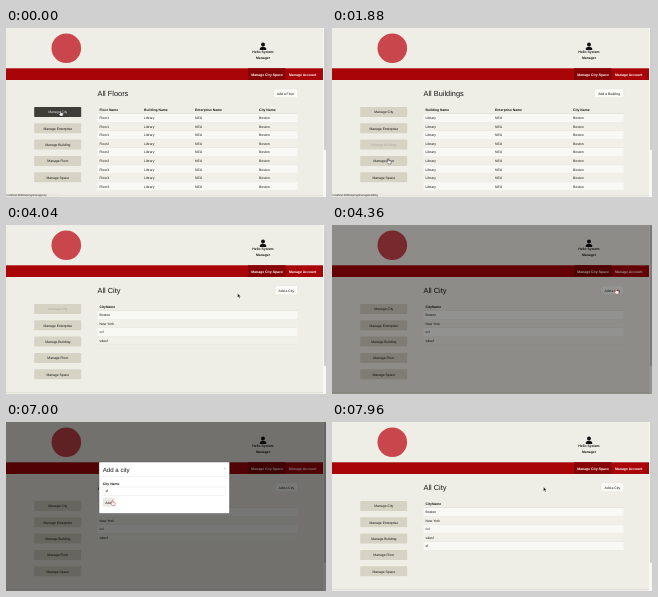
An HTML page that plays this animation: 320x169 px, repeating every 8 s.

```html
<!DOCTYPE html>
<html lang="en">
<head>
<meta charset="utf-8">
<title>Space manager</title>
<style>
html, body { margin: 0; width: 100%; height: 100%; overflow: hidden; background: #efeee6; }
svg { display: block; width: 100%; height: 100%; }
text { font-family: "Liberation Sans", Arial, sans-serif; font-size: 3.4px; fill: #151513; text-rendering: geometricPrecision; }
.b { font-weight: bold; }
.nav { font-weight: bold; font-size: 3.45px; fill: #fff; }
.mid { text-anchor: middle; }
</style>
</head>
<body>
<svg id="stage" viewBox="0 0 320 169" xmlns="http://www.w3.org/2000/svg"></svg>
<script>
const LOOP = 8000;
const ROW = 8.55;
const GAP = 16.3;          // distance between menu buttons
const FIRST = 240;         // first menu click
const BEAT = 580;          // time between menu clicks
const BACK = 3650;         // return to the city page
const SUBMIT = 7480;
const stage = document.getElementById('stage');

const text = (x, y, s, attrs = '') => `<text x="${x}" y="${y}" ${attrs}>${s}</text>`;
const rect = (x, y, w, h, fill, attrs = '') =>
  `<rect x="${x}" y="${y}" width="${w}" height="${h}" fill="${fill}" ${attrs}/>`;

const menu = ['City', 'Enterprise', 'Building', 'Floor', 'Space'];
const place = ['Library', 'NEU', 'Boston'];
const cities = ['Boston', 'New York', 'ccl', 'vdasf'].map(s => [s]);
const floors = Array.from({ length: 9 }, (_, i) => ['Floor' + (1 + Math.floor(i / 3)), ...place]);
const spaces = ['Room1', 'Room2', 'Room21', 'Room22', 'Room21', 'Room41', 'Toilet1', 'Toilet2', 'Toilet3']
  .map((name, i) => [name, 'Floor' + (i % 4 === 3 ? 2 : 1), ...place, i < 6]);

const page = (title, add, cols, head, rows) => ({ title, add, cols, head, rows });
const pages = {
  Floor: page('All Floors', 'Floor', [93.5, 138, 189, 253],
    ['Floor Name', 'Building Name', 'Enterprise Name', 'City Name'], floors),
  City: page('All City', 'City', [93.5], ['CityName'], cities),
  Added: page('All City', 'City', [93.5], ['CityName'], [...cities, ['sf']]),
  Enterprise: page('All Enterprises', 'Enterprise', [93.5, 190],
    ['Enterprise Name', 'City Name'], [['NEU', 'Boston']]),
  Building: page('All Buildings', 'Building', [93.5, 163, 241],
    ['Building Name', 'Enterprise Name', 'City Name'], Array(9).fill(place)),
  Space: page('All Space', 'Space', [93.5, 126, 155.5, 190.5, 232.5, 260],
    ['Space Name', 'Floor Name', 'Building Name', 'Enterprise Name', 'City Name', 'Space Status'], spaces)
};

function pageMarkup([id, p]) {
  const w = 16 + p.add.length * 1.65;
  const head = p.head.map((h, i) => text(p.cols[i], 82.7, h, 'class="b"')).join('');
  const rows = p.rows.map((cells, r) => {
    const y = 85.8 + r * ROW;
    return rect(91.5, y, 200, ROW, r % 2 ? '#f0efe8' : '#f8f8f5') +
      rect(91.5, y + ROW - .3, 200, .3, '#dddcd3') +
      cells.map((c, i) => text(p.cols[i], y + 5.4, c)).join('');
  }).join('');
  return `<g id="${id}">
    ${text(91.5, 68.3, p.title, 'style="font-size:7.4px"')}
    ${rect(291.7 - w, 60.7, w, 9, '#fbfbf8', 'rx=".8" stroke="#deddd4" stroke-width=".4"')}
    ${text(291.7 - w / 2, 66.5, 'Add a ' + p.add, 'class="mid"')}
    ${head}${rect(91.5, 85.2, 200, .6, '#d9d8cf')}${rows}
    ${rect(318.2, 0, 1.6, p.rows.length > 5 ? 122 : 141, '#c2c2bf', 'rx=".8"')}
  </g>`;
}

const buttons = menu.map((name, i) => {
  const y = 79 + i * GAP;
  return rect(28.2, y, 47, 10, '#d6d3c5', `id="box${i}" rx=".8"`) +
    text(51.8, y + 6.3, 'Manage ' + name, `id="label${i}" class="mid"`);
}).join('');

const header = `
  <circle cx="60.3" cy="20.3" r="14.8" fill="#c9464d"/>
  <circle cx="257" cy="16.6" r="2" fill="#111"/>
  <path d="M253.800 22v-1.200q0-1.800 3.200-2.100q3.200.3 3.200 2.100V22z" fill="#111"/>
  ${text(257, 25.4, 'Hello System', 'class="b mid"')}
  ${text(257, 31, 'Manager', 'class="b mid"')}
  ${rect(0, 40.3, 317, 11.7, '#a90508')}
  ${rect(242, 40.3, 37.5, 11.7, '#860204')}
  ${text(245.3, 48, 'Manage City-Space', 'class="nav"')}
  ${text(283, 48, 'Manage Account', 'class="nav"')}`;

const modal = `<g id="modal">
  ${rect(93, 40, 130.5, 51.5, '#fff', 'rx="1" stroke="#444" stroke-width=".4"')}
  ${text(96.8, 49.8, 'Add a city', 'style="font-size:6.1px"')}
  ${text(217.5, 47.5, '×', 'style="font-size:4.5px;fill:#bbb"')}
  ${rect(93, 54, 130.5, .4, '#e6e6e2')}
  ${text(96.8, 62.6, 'City Name', 'class="b"')}
  ${rect(96.8, 65, 122.5, 8.5, '#fff', 'id="field" rx=".6" stroke-width=".5"')}
  ${text(99.4, 70.3, '', 'id="typed"')}
  ${rect(96.8, 75.8, 11.5, 9, '#fff', 'id="addBox" rx=".6"')}
  ${text(99.3, 81.5, 'Add')}
</g>`;

stage.innerHTML = `
  ${rect(0, 0, 320, 169, '#efeee6')}${header}${buttons}
  ${rect(317, 0, 3, 169, '#f7f7f4')}${rect(0, 167.3, 317, .5, '#d0cfc8')}
  ${Object.entries(pages).map(pageMarkup).join('')}
  <g id="status">${rect(0, 165.5, 52, 3.5, '#e8e7e0')}${text(.6, 168.2, '', 'id="url" style="font-size:2.7px"')}</g>
  ${rect(0, 0, 320, 169, '#000', 'id="dim"')}${modal}
  <path id="arrow" d="M0 0v4.2l1-.9l.7 1.6l.7-.3l-.7-1.6h1.3z" fill="#111" stroke="#fff" stroke-width=".3"/>
  <path id="hand" d="M-.5 0q.5-.5 1 0v1.7l2 .5q.5.2.4.8l-.4 2h-2.6l-1.700-2q0-.8.8-.5l.5.4z" fill="#fff" stroke-width=".45"/>`;

const el = id => document.getElementById(id);
const set = (id, name, value) => el(id).setAttribute(name, value);
const show = (id, on) => set(id, 'visibility', on ? 'visible' : 'hidden');
const ramp = (t, a, b) => Math.max(0, Math.min(1, (t - a) / (b - a)));
const ease = u => u * u * (3 - 2 * u);

// Pointer moves after the menu tour: start, end, x, y, hand on arrival
const moves = [
  [2800, 3160, 78, 110, false],
  [3250, 3500, 57, 83, true],
  [3800, 4150, 284, 64, true],
  [4650, 5500, 123, 74, false],
  [6600, 6950, 106.5, 78.5, true],
  [7300, 7850, 211.5, 65, false]
];

// The tour clicks each menu button in turn, one per beat.
function tour(t) {
  const step = Math.min(4, Math.floor((t - FIRST) / BEAT));
  const local = t - FIRST - step * BEAT;
  const pos = Math.min(4, step + ease(ramp(local, 120, 340)));
  const pressed = step < 0 || (step < 4 && local > 490) ? step + 1 : -1;
  return { step, pos, pressed };
}

function pointer(t, pos) {
  let x = 54.5 + pos * .6, y = 83 + pos * GAP * .98, hand = true;
  for (const [a, b, u, v, over] of moves) {
    if (t < a) break;
    const k = ease(ramp(t, a, b));
    x += (u - x) * k;
    y += (v - y) * k;
    hand = over && k > .9;
  }
  return { x, y, hand };
}

function draw(t) {
  const { step, pos, pressed } = tour(t);
  const back = t >= BACK;
  const current = t >= SUBMIT ? 'Added' : back ? 'City' : menu[step] || 'Floor';
  const press = t > BACK - 90 && !back ? 0 : pressed;
  const focus = t > 4200 ? -1 : back ? 0 : step;
  Object.keys(pages).forEach(id => show(id, id === current));
  menu.forEach((_, i) => {
    set('box' + i, 'fill', i === press ? '#3e3d38' : '#d6d3c5');
    el('label' + i).style.fill = i === press ? '#f2f1ec' : i === focus ? '#a9a799' : '#151513';
  });

  const link = t > 3400 ? 'City' : t > 3000 ? 'Building' : menu[Math.max(0, step)];
  show('status', t < 3850);
  el('url').textContent = 'localhost:8080/spring/manage' + link.toLowerCase();

  set('dim', 'opacity', .52 * ramp(t, 4230, 4395) * (1 - ramp(t, 7500, 7640)));
  const open = ease(ramp(t, 4395, 4695)) * (1 - ease(ramp(t, 7240, 7500)));
  set('modal', 'opacity', open);
  set('modal', 'transform', `translate(0 ${-14 * (1 - open)})`);
  set('field', 'stroke', t > 5250 && t < 6960 ? '#9fcbe6' : '#e6e6e2');
  el('typed').textContent = 'sf'.slice(0, Math.max(0, Math.floor((t - 4800) / 700)));
  set('addBox', 'fill', t > 6900 ? '#e9e9e6' : '#fff');

  const { x, y, hand } = pointer(t, pos);
  show('hand', hand);
  show('arrow', !hand);
  set('hand', 'stroke', t > 4240 ? '#b8343c' : '#111');
  set(hand ? 'hand' : 'arrow', 'transform', `translate(${x} ${y})`);
}

function tick() {
  draw(performance.now() % LOOP);
  requestAnimationFrame(tick);
}
tick();
</script>
</body>
</html>
```
